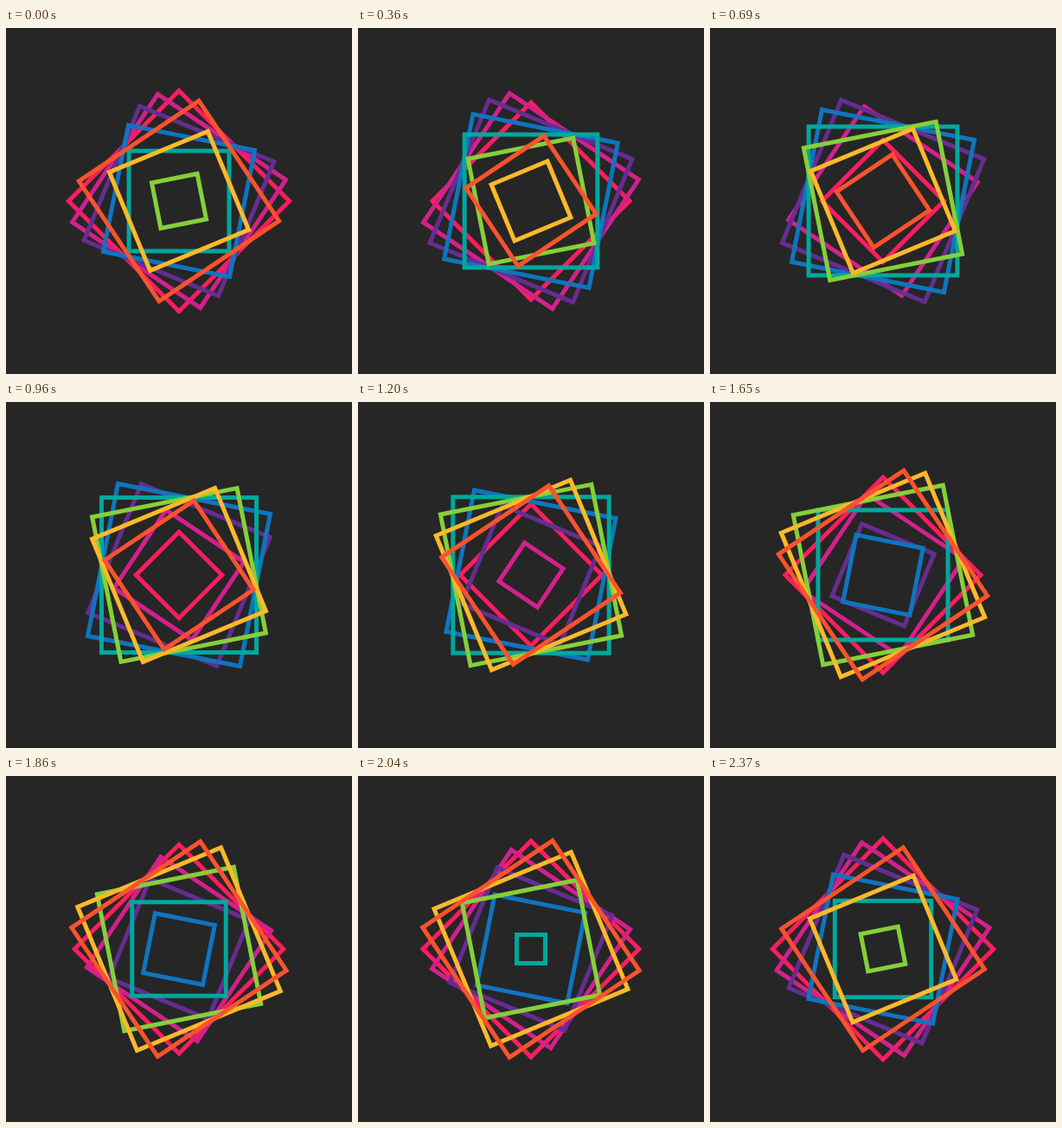
An HTML page with a canvas for the animation above (2400 ms loop, 400x400 px).

```html
<!DOCTYPE html>
<html lang="en">
<head>
<meta charset="utf-8">
<title>Nested squares</title>
<style>
  html, body { margin: 0; width: 100%; height: 100%; overflow: hidden; background: #262626; }
  canvas { display: block; width: 400px; height: 400px; }
</style>
</head>
<body>
<canvas id="stage" width="400" height="400"></canvas>
<script>
const ctx = document.getElementById('stage').getContext('2d');

const LOOP = 2400;
const STEP = 30;
const PEAK = -40;
const SHRINK = 880;
const GROW = LOOP - SHRINK;
const MAX_HALF = 90.3;
const MIN_HALF = 16.5;
const COLORS = ['#fa1e5f', '#d2218b', '#662d91', '#0f75bf', '#00a79d', '#86cf3a', '#fdb92a', '#f9532d'];

const bezier = (s, a, b) => 3 * (1 - s) * (1 - s) * s * a + 3 * (1 - s) * s * s * b + s * s * s;

function ease(x) {
  let low = 0, high = 1;
  for (let i = 0; i < 24; i++) {
    const mid = (low + high) / 2;
    if (bezier(mid, 0.33, 0.8) < x) low = mid;
    else high = mid;
  }
  return bezier(low, 0, 0.2);
}

// Half the side length: a quick shrink followed by a slower mirrored growth.
function halfSide(time) {
  const t = ((time - PEAK) % LOOP + LOOP) % LOOP;
  const u = t < SHRINK ? t / SHRINK : (LOOP - t) / GROW;
  return MAX_HALF - (MAX_HALF - MIN_HALF) * ease(u);
}

function draw(time) {
  ctx.fillStyle = '#262626';
  ctx.fillRect(0, 0, 400, 400);
  ctx.lineWidth = 5;
  COLORS.forEach((color, i) => {
    const half = halfSide(time - i * LOOP / COLORS.length);
    ctx.save();
    ctx.translate(200, 200);
    ctx.rotate((4 - i) * -Math.PI / 16 + Math.PI / 2);
    ctx.rotate(2 * (4 - i) * Math.PI / 16);
    ctx.strokeStyle = color;
    ctx.strokeRect(-half, -half, 2 * half, 2 * half);
    ctx.restore();
  });
}

const start = performance.now();
function frame() {
  const elapsed = Math.max(0, performance.now() - start) % LOOP;
  draw(Math.floor(elapsed / STEP) * STEP);
  requestAnimationFrame(frame);
}
frame();
</script>
</body>
</html>
```
